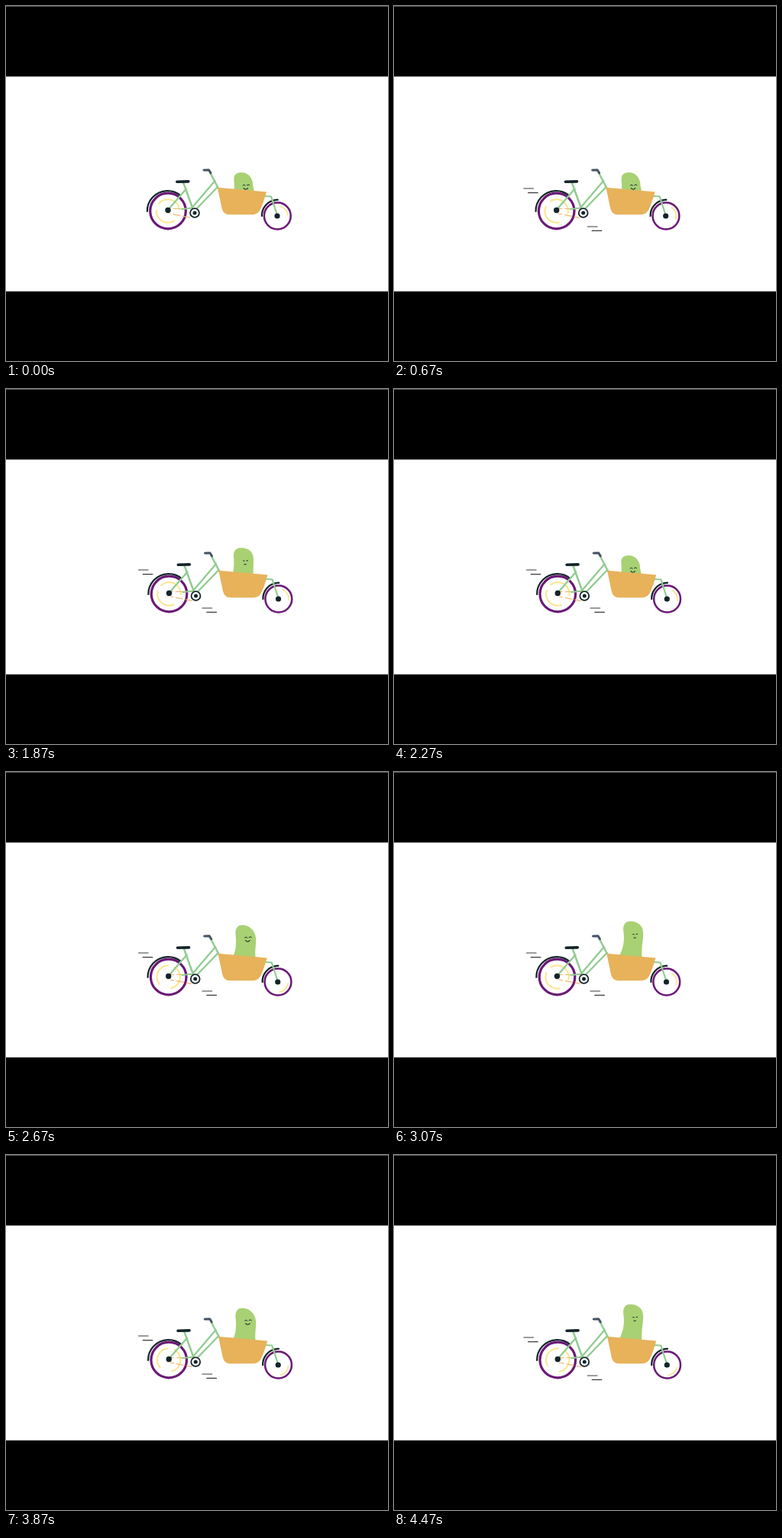
Write an HTML page with a canvas that moves like this. It is 500 by 465 pixels and loops after 4.67 s.

```html
<!DOCTYPE html>
<html lang="en">
<head>
<meta charset="utf-8">
<title>Cargo bike ride</title>
<style>
html, body { margin: 0; width: 100%; height: 100%; overflow: hidden; background: #000; }
canvas { display: block; width: 500px; height: 465px; }
</style>
</head>
<body>
<canvas id="stage" width="500" height="465"></canvas>
<script>
const ctx = document.getElementById('stage').getContext('2d');
const LOOP = 4670;
const INK = '#14242a', GREEN = '#91cc90', PURPLE = '#6b1877', YELLOW = '#fae68c',
      ORANGE = '#f2b56e', CRATE = '#e7b25a', BEAN = '#a8d173', GRIP = '#465565';

// One letter per pose: bean shape, face position, smiling or not
const poses = {
  a: { d: 'M297 246C300 239 298.5 232 298.3 227C298 221 302 218 308 218C316 218 322 224 323 232C323 237 325 240 325 246Z', x: 314.2, y: 235, smile: true },
  b: { d: 'M295.5 246C298 239 299 232 298 220C297.3 212 301 208 308 208C317 208 323 213 323.8 221C324.5 229 323 236 324 246Z', x: 313.5, y: 225, smile: false },
  c: { d: 'M296 244C300 236 302 229 300.6 214C299.5 205 303 200.5 309 200.5C319 200.5 326 208 327 217C328 226 325 232 327 246Z', x: 316.8, y: 217, smile: true },
  d: { d: 'M294 243C300 231 302 222 300.5 210C299 201 302 195.5 309 195.5C318 195.5 325 200 326 209C327 221 323 227 325 246Z', x: 315.6, y: 212.5, smile: false }
};
for (const p of Object.values(poses)) p.path = new Path2D(p.d);

// Speed line offsets, drifting back and down
const drift = { C: [0, 0], B: [-3.6, 2], D: [-5, 2.5], A: [-8, 4] };

// Each step holds: bike shift, bean pose, speed lines, wheel angle in degrees
const steps = [
  [0, 'a', '-', -40], [0, 'a', 'B', -40], [.7, 'a', 'A', 40], [1.5, 'a', 'D', -30],
  [.7, 'a', 'B', -20], [1.5, 'a', 'A', 45], [2.3, 'a', 'D', -25], [1.5, 'a', 'B', 40],
  [1.5, 'a', 'C', -20], [2, 'b', 'D', 40], [1.5, 'b', 'C', -30], [1.5, 'b', 'B', 45],
  [2.3, 'a', 'C', -25], [1, 'a', 'C', -20], [.7, 'c', 'C', 45], [2, 'd', 'D', 40],
  [1.5, 'd', 'C', -20], [2, 'b', 'B', 40], [2.3, 'a', 'C', -30], [1.5, 'c', 'B', -20],
  [1.2, 'c', 'C', 42], [2, 'c', 'D', -25], [1.5, 'd', 'C', -20], [2.3, 'd', 'B', 50]
];
const stepAt = t => t < 100 ? 0 : t < 270 ? 1 : Math.min(23, 2 + Math.floor((t - 270) / 200));
const rad = deg => deg * Math.PI / 180;

function stroke(color, width, cap = 'round') {
  ctx.strokeStyle = color;
  ctx.lineWidth = width;
  ctx.lineCap = cap;
  ctx.lineJoin = 'round';
  ctx.stroke();
}

function line(color, width, ...pts) {
  ctx.beginPath();
  for (let i = 0; i < pts.length; i += 2) ctx.lineTo(pts[i], pts[i + 1]);
  stroke(color, width);
}

function arc(x, y, r, from, to, color, width) {
  ctx.beginPath();
  ctx.arc(x, y, r, rad(from), rad(to));
  stroke(color, width, 'butt');
}

function dot(x, y, r, color) {
  ctx.beginPath();
  ctx.arc(x, y, r, 0, 7);
  ctx.fillStyle = color;
  ctx.fill();
}

function curve(x, y, w, h, width) {
  ctx.beginPath();
  ctx.moveTo(x - w, y);
  ctx.quadraticCurveTo(x, y + h, x + w, y);
  stroke(INK, width);
}

function drawBean({ path, x, y, smile }, shift) {
  ctx.save();
  ctx.translate(shift, 0);
  ctx.fillStyle = BEAN;
  ctx.fill(path);
  if (smile) {
    curve(x - 2.6, y, 1.6, -1.8, 1);
    curve(x + 2.9, y - .4, 1.6, -1.8, 1);
    curve(x - .4, y + 3.6, 2.7, 3.2, 1.1);
  } else {
    line(INK, 1, x - 3, y, x - 1.3, y + .2);
    line(INK, 1, x + 1.3, y, x + 3, y - .3);
    line(INK, 1, x - 1.8, y + 4.8, x + .8, y + 4.6);
  }
  ctx.restore();
}

function drawBike(angle) {
  // Rear wheel
  arc(212, 268.5, 15.2, angle + 95, angle + 225, YELLOW, 2);
  arc(212, 268.5, 15.2, angle + 255, angle + 395, YELLOW, 2);
  arc(212, 268.5, 23.3, 0, 360, PURPLE, 3.2);
  arc(211.5, 268.8, 26.7, 178, 309, INK, 2.2);

  // Chain
  ctx.setLineDash([9, 4]);
  ctx.lineDashOffset = -angle / 5;
  line(ORANGE, 1.2, 214, 265.5, 243, 265.5);
  line(ORANGE, 1.2, 214, 272, 242, 277.3);
  ctx.setLineDash([]);

  // Frame
  line(GREEN, 2.3, 212, 267, 236, 239.5);
  line(GREEN, 2.2, 230, 266, 244, 264.5);
  line(GREEN, 2.5, 232, 231, 245, 267);
  line(GREEN, 2.3, 244.5, 263, 273.5, 229);
  line(GREEN, 2.3, 249, 266, 277, 237);
  line(GREEN, 2.5, 267, 218, 278, 239);
  line(INK, 3.6, 223.8, 230.2, 238.8, 229.9);
  line(GRIP, 3, 259, 215, 265.5, 214.8, 268, 218.8);
  dot(212, 267.5, 3.7, INK);
  dot(247, 271, 6, '#fff');
  arc(247, 271, 5.9, 0, 360, INK, 1.8);
  dot(247, 271, 2.5, INK);

  // Front wheel
  arc(355.3, 275, 13.3, angle - 38, angle + 38, YELLOW, 1.7);
  arc(355.3, 275, 17.4, 0, 360, PURPLE, 2.5);
  arc(355.5, 274.5, 20.6, 176, 273, INK, 2.2);
  line(GREEN, 2.2, 338, 249, 347, 249.5, 355, 274);
  dot(355, 275, 3.6, INK);
}

function drawCrate() {
  ctx.fillStyle = CRATE;
  ctx.fill(new Path2D('M276.8 237.7L341 243.5Q337 257 334 264Q330.5 273.2 323 273.2L292 273.2Q284.5 273.2 282.5 265Z'));
}

function drawSpeed([dx, dy]) {
  const marks = [[173.5, 237], [179.2, 242.7], [257, 287], [262.8, 292.4]];
  for (const [x, y] of marks) line('#3a3a3a', 1.2, x + dx, y + dy, x + dx + 12.6, y + dy);
}

function render(t) {
  const [shift, pose, speed, angle] = steps[stepAt(t)];
  ctx.fillStyle = '#000';
  ctx.fillRect(0, 0, 500, 465);
  ctx.fillStyle = '#555';
  ctx.fillRect(0, 0, 500, 1);
  ctx.fillStyle = '#fff';
  ctx.fillRect(0, 92.4, 500, 281.4);

  if (speed !== '-') drawSpeed(drift[speed]);
  ctx.save();
  ctx.translate(shift, 0);
  drawBike(angle);
  ctx.restore();
  drawBean(poses[pose], pose === 'a' ? -Math.min(1, shift) : 0);
  ctx.save();
  ctx.translate(shift, 0);
  drawCrate();
  ctx.restore();
}

const start = performance.now();
function tick(now) {
  render(Math.max(0, now - start) % LOOP);
  requestAnimationFrame(tick);
}
render(0);
requestAnimationFrame(tick);
</script>
</body>
</html>
```
